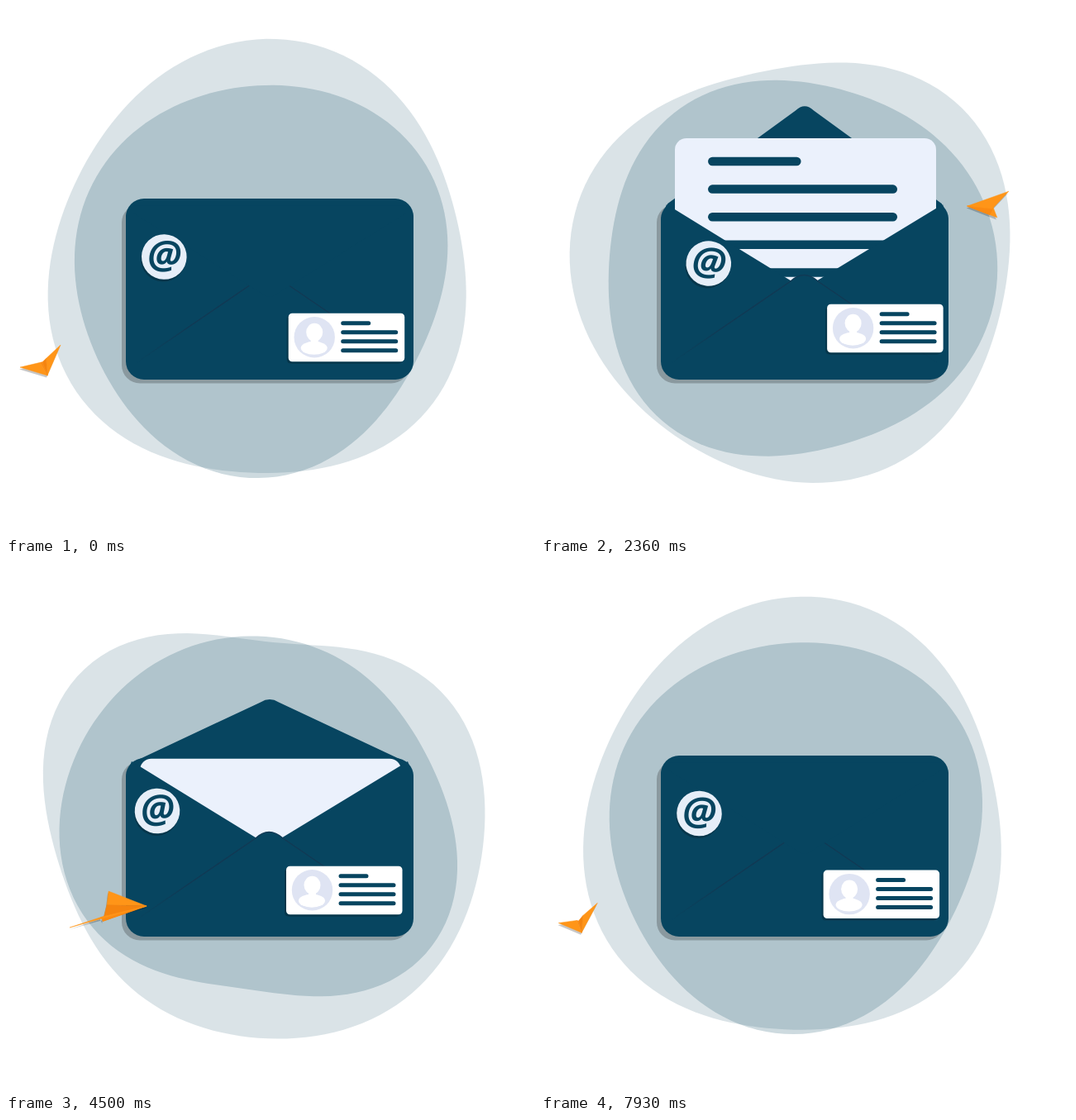
Write an HTML page that moves like this. It is 640 by 640 pixels and loops after 8000 ms.

```html
<!DOCTYPE html>
<html lang="en">
<head>
<meta charset="utf-8">
<title>Envelope</title>
<style>
  html, body { margin: 0; width: 100%; height: 100%; overflow: hidden; background: #fff; }
  svg { display: block; width: 100%; height: 100%; }
  .navy { fill: #074560; }
  .rule { stroke: #074560; stroke-linecap: round; fill: none; }
  .shade { fill: #000; fill-opacity: .22; }
  text { font: italic 700 47px "Open Sans", "Noto Sans", sans-serif; text-anchor: middle; }
</style>
</head>
<body>
<svg viewBox="0 0 640 640">
  <defs>
    <linearGradient id="fold" gradientUnits="userSpaceOnUse" x1="157" y1="0" x2="480" y2="0">
      <stop offset="0" stop-color="#103954" stop-opacity="0"/>
      <stop offset=".2" stop-color="#103954"/>
      <stop offset=".8" stop-color="#103954"/>
      <stop offset="1" stop-color="#103954" stop-opacity="0"/>
    </linearGradient>
  </defs>
  <path id="outer" class="navy" fill-opacity=".15"/>
  <path id="inner" class="navy" fill-opacity=".2"/>
  <g id="envelope">
    <rect class="shade" x="140" y="240" width="348" height="216.5" rx="22"/>
    <rect class="navy" x="145" y="236" width="348" height="216" rx="22"/>
    <path id="flapBack" class="navy"/>
    <g id="letter">
      <rect x="162" width="316" height="185" rx="14" fill="#ebf1fc"/>
      <g id="lines" class="rule" stroke-width="10.5"></g>
    </g>
    <path class="navy" d="M152 240L318 342L486 240L492 256V425H146V256Z"/>
    <path class="navy" stroke="url(#fold)" stroke-width="1.5" d="M157 432L302 333Q318 318 335 333L480 432"/>
    <g id="flapFront" class="navy">
      <path d="M145 258V255A22 22 0 0 1 167 233H471A22 22 0 0 1 493 255V258Z"/>
      <path id="flapTip"/>
    </g>
  </g>
  <g id="badge">
    <circle class="shade" cx="-1" cy="3" r="27"/>
    <circle r="27.3" fill="#e6eef8"/>
    <text class="navy" y="14">@</text>
  </g>
  <g id="card">
    <rect class="shade" x="-2" y="2" width="140" height="59" rx="5"/>
    <rect width="140.5" height="58.5" rx="4.5" fill="#fff"/>
    <circle cx="31.5" cy="29" r="24.7" fill="#dfe4f3"/>
    <ellipse cx="31.5" cy="23" rx="10" ry="11" fill="#fff"/>
    <rect x="27" y="30" width="9" height="8" fill="#fff"/>
    <ellipse cx="31" cy="42" rx="16" ry="8" fill="#fff"/>
    <path class="rule" stroke-width="5" d="M66 12H97M66 23H130M66 34H130M66 45H130"/>
  </g>
  <g id="plane"></g>
</svg>
<script>
const LOOP = 8000, HALF = LOOP / 2, STEP = LOOP / 112;
const $ = id => document.getElementById(id);
const set = (el, k, v) => el.setAttribute(k, v);
const mix = (a, b, f) => a + (b - a) * f;
const mixAll = (a, b, f) => a.map((v, i) => mix(v, b[i], f));
const ramp = (t, a, b) => Math.min(1, Math.max(0, (t - a) / (b - a)));
const smooth = f => f * f * (3 - 2 * f);

// Four poses per blob: its reach to E, SE, S, SW, W, NW, N, NE.
const OUTER = [
  [245, 265, 250, 269, 257, 252, 275, 258],
  [251, 259, 260, 254, 278, 253, 250, 279],
  [276, 277, 266, 256, 261, 285, 210, 263],
  [249, 265, 242, 244, 252, 273, 252, 255]
];
const INNER = [
  [223, 225, 256, 236, 227, 225, 219, 232],
  [244, 226, 234, 251, 223, 238, 222, 231],
  [234, 251, 195, 234, 250, 236, 232, 216],
  [218, 247, 228, 216, 231, 232, 209, 211]
];
// Key places: time, x, y.
const BADGE = [
  [0, 191.3, 303.5], [1430, 203.7, 309.5], [3140, 198.5, 311],
  [4500, 183, 300], [5570, 187.5, 303], [6710, 206, 293.5]
];
const CARD = [
  [0, 341.7, 371.8], [1430, 344.7, 365], [3140, 346, 359],
  [4500, 339, 366.7], [5570, 347.7, 362], [6710, 341.7, 360.7]
];
// Key poses: time, then nose, left tip and right tip.
const PLANE = [
  [0, 10, 17, 26, -20, -23, 7],
  [500, 45, -5, -1, -23, -48, 21],
  [1500, 32, -14, -25, 13, 35, 15],
  [2500, -30, 4, 14, 14, 20, -18]
];

// Trigonometric interpolation gives a smooth closed outline.
function blobPath(poses, t) {
  const at = t / 2000, i = Math.floor(at);
  const reach = mixAll(poses[i], poses[(i + 1) % 4], at - i);
  const pts = [];
  for (let deg = 1; deg < 360; deg += 2.5) {
    const w = deg * Math.PI / 180;
    const r = reach.reduce((sum, v, k) => {
      const x = w - k * Math.PI / 4;
      return sum + v * Math.sin(4 * x) / (8 * Math.tan(x / 2));
    }, 0);
    pts.push((310 + r * Math.cos(w)).toFixed(2) + ' ' + (315 + r * Math.sin(w)).toFixed(2));
  }
  return 'M' + pts.join('L') + 'Z';
}

// Smooth closed curve through rows of [time, ...values].
function spline(rows, period, t) {
  const n = rows.length;
  const row = i => {
    const r = rows[(i + n) % n];
    return [r[0] + Math.floor(i / n) * period, ...r.slice(1)];
  };
  let i = n - 1;
  while (rows[i][0] > t) i--;
  const [a, b, c, d] = [row(i - 1), row(i), row(i + 1), row(i + 2)];
  const span = c[0] - b[0], f = (t - b[0]) / span;
  const slope = (p, q, k) => (q[k] - p[k]) / (q[0] - p[0]) * span;
  return b.map((v, k) => mix(v, c[k], smooth(f)) +
    f * (1 - f) * ((1 - f) * slope(a, c, k) - f * slope(b, d, k))).slice(1);
}

function add(parent, tag, attrs = {}) {
  const el = document.createElementNS('http://www.w3.org/2000/svg', tag);
  for (const k in attrs) set(el, k, attrs[k]);
  return parent.appendChild(el);
}

const plane = $('plane'), svg = plane.parentNode;
const planeShade = add(plane, 'path', { class: 'shade', transform: 'translate(-1 2.5)' });
const faces = ['#ff9518', '#f5840f', '#fb8a12', '#ff9518'].map(c =>
  add(plane, 'path', { fill: c, stroke: c, 'stroke-width': .5 }));
const lines = [0, 1, 2, 3, 4].map(() => add($('lines'), 'path'));
for (const id of ['flapBack', 'flapTip'])
  set($(id), 'd', 'M-166 4V-5.8L-11 -118.5Q0 -129 11 -118.5L166 -5.8V4Z');

// The plane circles the envelope, passing behind it on the way back.
function drawPlane(p) {
  const w = p / HALF * 2 * Math.PI, c = Math.cos(w), c2 = Math.cos(2 * w);
  const dip = Math.abs(Math.sin(w));
  const v = spline(PLANE, HALF, p);
  const nose = v.slice(0, 2), left = v.slice(2, 4), right = v.slice(4);
  const tail = mixAll(mixAll(left, right, .5), nose, .3);
  const keel = [tail[0] - 6 * dip, tail[1] + 22 * dip];
  const rim = [left, mixAll(tail, left, .2), keel,
    mixAll(mixAll(tail, keel, .6), right, .1), right];
  const poly = pts => 'M' + pts.map(q => q.join(' ')).join('L') + 'Z';
  set(plane, 'transform', `translate(${316 - 270 * c - 6 * c2} ${342.6 + 109.5 * c - 22 * c2})`);
  set(planeShade, 'd', poly([nose, ...rim]));
  faces.forEach((el, i) => set(el, 'd', poly([nose, rim[i], rim[i + 1]])));
  const next = p < HALF / 2 ? null : $('envelope');
  if (plane.nextElementSibling !== next) svg.insertBefore(plane, next);
}

function drawMail(p) {
  const open = mix(-.86, 1, ramp(p, 95, 595) - ramp(p, 3400, 3900));
  for (const id of ['flapBack', 'flapTip'])
    set($(id), 'transform', `translate(319 245) scale(1 ${open})`);
  set($('flapBack'), 'visibility', open > 0 ? 'visible' : 'hidden');
  set($('flapFront'), 'visibility', open > 0 ? 'hidden' : 'visible');
  const rise = smooth(ramp(p, 600, 1300)) - smooth(ramp(p, 2710, 3300));
  set($('letter'), 'transform', `translate(0 ${236.7 - 76.7 * rise})`);
  lines.forEach((el, i) => {
    const f = ramp(p, 610 + 175 * i, 860 + 175 * i), full = i ? 218.5 : 102;
    set(el, 'd', f ? `M207.3 ${28 + 33.6 * i}h${full * f}` : '');
  });
}

function draw(now) {
  const t = Math.floor((now % LOOP) / STEP + .03) * STEP % LOOP;
  set($('outer'), 'd', blobPath(OUTER, t));
  set($('inner'), 'd', blobPath(INNER, t));
  drawMail(t % HALF);
  drawPlane(t % HALF);
  const [bx, by] = spline(BADGE, LOOP, t), [x, y] = spline(CARD, LOOP, t);
  set($('badge'), 'transform', `translate(${bx} ${by}) rotate(${(bx - 189) * .5})`);
  set($('card'), 'transform', `translate(${x} ${y})`);
}

const start = performance.now();
function tick() {
  draw(performance.now() - start);
  requestAnimationFrame(tick);
}
tick();
</script>
</body>
</html>
```
